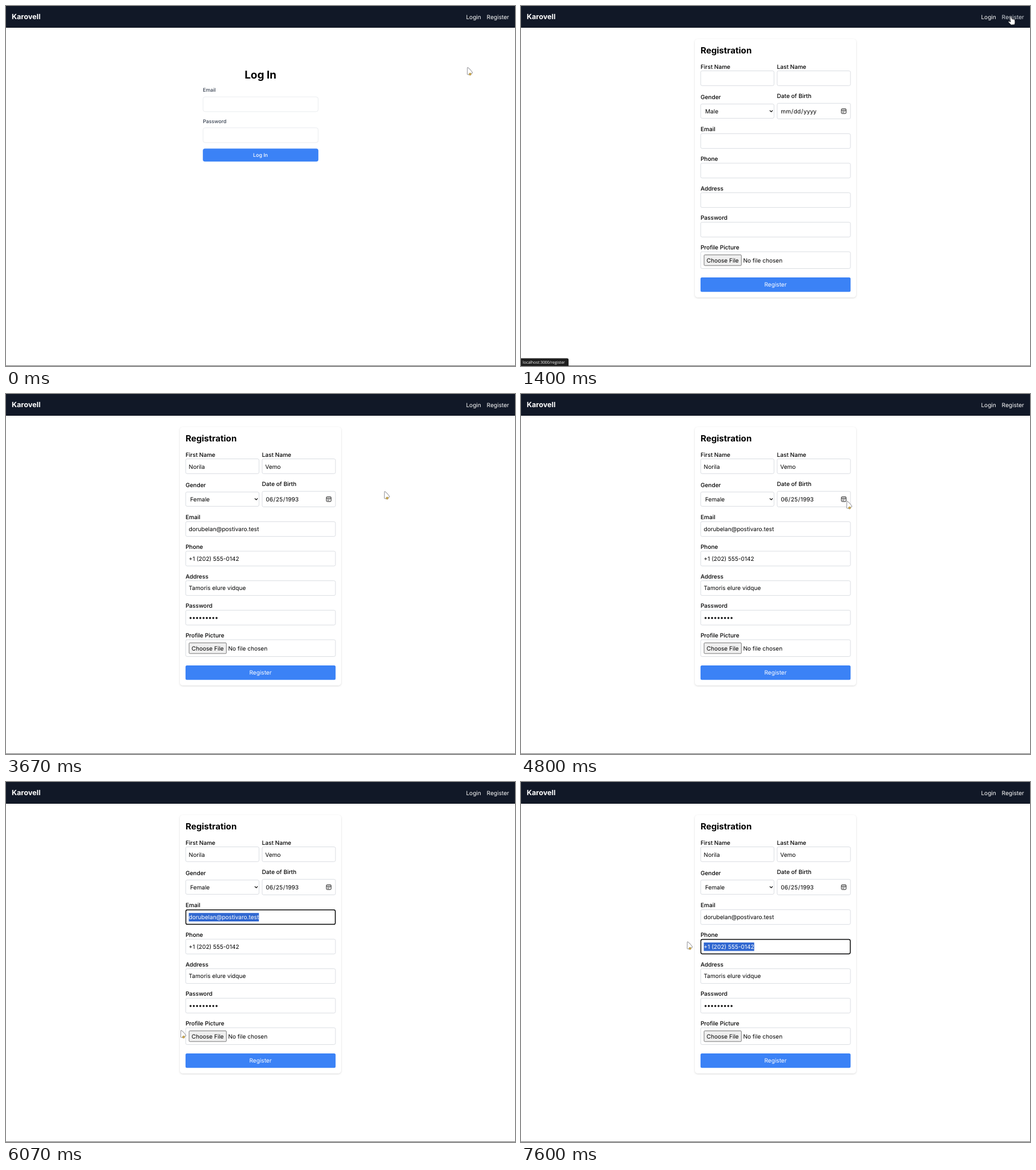
These frames come from a looping animation (890 px wide and 630 px high, 8 s). An HTML page:

```html
<!DOCTYPE html>
<html lang="en">
<head>
<meta charset="utf-8">
<title>Registration form</title>
<style>
html, body { margin: 0; width: 100%; height: 100%; overflow: hidden; background: #fff; }
svg { display: block; width: 100%; height: 100%; }
text { font-family: Inter, sans-serif; font-size: 10.08px; text-rendering: geometricPrecision; white-space: pre; }
.b { font-weight: 700; }
.m { font-weight: 500; }
.s { font-size: 8.82px; }
.mid { text-anchor: middle; }
.bar { filter: drop-shadow(0 1.6px 1.8px rgba(0, 0, 0, .16)); }
.card { filter: drop-shadow(0 1.6px 1.8px rgba(0, 0, 0, .15)); }
#status text { font-family: "Open Sans", sans-serif; font-size: 6.95px; }
</style>
</head>
<body>
<svg id="stage" viewBox="0 0 890 630" preserveAspectRatio="none"></svg>
<script>
const LOOP = 8000, STEP = 200 / 3;
const ROW = 51.66;
const BLUE = '#3b82f6';
const EMAIL = 'dorubelan@postivaro.test';
const PHONE = '+1 (202) 555-0142';

const text = (x, y, s, cls = '', fill = '#000', extra = '') =>
  `<text x="${x}" y="${y}" class="${cls}" fill="${fill}" ${extra}>${s}</text>`;
const rect = (x, y, w, h, fill, extra = '') =>
  `<rect x="${x}" y="${y}" width="${w}" height="${h}" fill="${fill}" ${extra}/>`;
const box = (x, y, w, h, line = '#d1d5db', r = 2.5) =>
  rect(x + .3, y + .3, w - .6, h - .6, '#fff', `rx="${r}" stroke="${line}" stroke-width=".8"`);
const group = (id, body) => `<g id="${id}">${body}</g>`;
const date = (a, b, c) =>
  text(454.3, 187.8, [a, '/', b, '/', c].map((p, i) => `<tspan dx="${i ? .63 : 0}">${p}</tspan>`).join(''));

const header =
  rect(0, 0, 890, 37.8, '#111827', 'class="bar"') +
  rect(0, 36.9, 890, .9, '#0b101c') +
  text(10, 23.3, 'Karovell', 'b', '#fff', 'style="font-size:12.6px"') +
  text(804.4, 22.8, 'Login', '', '#fff') +
  text(840.6, 22.8, 'Register', '', '#fff', 'id="link"');

const login =
  text(445, 126.7, 'Log In', 'b mid', '#000', 'style="font-size:18.9px"') +
  text(344.2, 150.4, 'Email', 's m', '#374151') +
  box(344.2, 158.7, 202, 26.5, '#e5e7eb', 3.8) +
  text(344.2, 204.6, 'Password', 's m', '#374151') +
  box(344.2, 212.8, 202, 26.5, '#e5e7eb', 3.8) +
  rect(344.2, 249.5, 202, 22.7, BLUE, 'rx="3.8"') +
  text(445, 264, 'Log In', 's m mid', '#fff');

const calendar =
  `<g fill="none" stroke="#111" stroke-width=".95">
    <rect x="560.2" y="179.8" width="8.2" height="8.4" rx="1.4"/><path d="M560.2 182.3h8.2"/>
    <path d="M562 184.3h4.8M562 186.2h3" stroke-dasharray="1.2 .6"/></g>`;

const labels = ['Email', 'Phone', 'Address', 'Password', 'Profile Picture'];
const register =
  rect(304, 57.8, 282, 452.2, '#fff', 'rx="5" class="card"') +
  text(313.9, 83.2, 'Registration', 'b', '#000', 'style="font-size:15.12px"') +
  text(313.9, 109.6, 'First Name', 'm') + box(313.9, 113.2, 128.8, 26.5) +
  text(447.6, 109.6, 'Last Name', 'm') + box(447.6, 113.2, 128.8, 26.5) +
  text(313.9, 162.6, 'Gender', 'm') + box(313.9, 171.2, 128.8, 25.6) +
  '<path d="M434.9 182.6l2.6 2.6 2.6-2.6" fill="none" stroke="#000" stroke-width="1.2"/>' +
  text(447.6, 161.4, 'Date of Birth', 'm') + box(447.6, 170, 128.8, 27.8) + calendar +
  labels.map((s, i) => text(313.9, 219.3 + ROW * i, s, 'm') +
    box(313.9, 223.1 + ROW * i, 262.4, i == 4 ? 30 : 26.5)).join('') +
  rect(320.1, 435.5, 65.2, 18.7, '#efefef', 'rx="1.3" stroke="#6b6b6b" stroke-width=".9"') +
  text(324.6, 448.5, 'Choose File') + text(388.4, 448.5, 'No file chosen') +
  rect(313.9, 475, 262.4, 25.2, BLUE, 'rx="2.5"') +
  text(445, 491.4, 'Register', 'mid', '#fff');

const dots = Array.from({ length: 9 }, (_, i) =>
  `<circle cx="${322.7 + 5.68 * i}" cy="391.9" r="1.75"/>`).join('');
const blank = text(322, 187.9, 'Male') + date('mm', 'dd', 'yyyy');
const filled =
  text(319.6, 130.6, 'Norila') + text(453.2, 130.6, 'Vemo') +
  text(322, 187.9, 'Female') + date('06', '25', '1993') +
  text(319.6, 240.1, EMAIL, '', '#000', 'id="email"') +
  text(319.6, 240.1 + ROW, PHONE, '', '#000', 'id="phone"') +
  text(319.6, 240.1 + 2 * ROW, 'Tamoris elure vidque') + dots;

const focus = rect(314.5, 223.8, 261.2, 25.2, 'none', 'rx="2.6" stroke="#0c0c0c" stroke-width="1.5"') +
  rect(0, 229.4, .8, 14.6, '#000', 'id="caret"') +
  group('marked', rect(0, 229.2, 0, 14.8, '#3067d0', 'id="mark"') +
    '<clipPath id="cut"><rect id="cutBox" y="228" height="18"/></clipPath>' +
    text(319.6, 240.1, '', '', '#fff', 'id="white" clip-path="url(#cut)"'));

const status =
  '<path d="M0 616.6h80.5q2.7 0 2.7 2.7V630H0z" fill="#1f1f1f"/>' +
  text(3, 626, 'localhost:3000/register', '', '#fff');

const cursors =
  group('arrow', `<path d="M.7 1.6Q.8 .2 2 .9Q6.5 4.300 9.600 9.300Q9.800 10.200 8.800 10.600L4.700 13.200L1.300 12.900Q.5 12.800.5 12Z"
    fill="#fff" stroke="#9b9ba0" stroke-width="1.1"/><circle cx="5.500" cy="12.300" r="2" fill="#d0aa48" stroke="#9c8752" stroke-width=".6"/>`) +
  group('hand', `<path d="M1.300 1Q2.300 0 3.300 1L4.700 5.200Q5.800 4.600 6.300 5.200Q7.300 4.700 7.800 5.500Q9 5.200 9.300 6.500L9.800 10Q9.800 12 8.800 14.500L3.200 15L-1.600 10.200Q-2.300 8.800-.8 8.700L2 10.100Z"
    fill="#fff" stroke="#222" stroke-width=".6"/>`) +
  group('beam', '<path d="M-3 -6H3M-3 6H3M0 -6V6" fill="none" stroke="#a49c8c" stroke-width="1.8"/>');

const stage = document.getElementById('stage');
stage.innerHTML = rect(0, 0, 890, 630, '#fff') + header + group('login', login) +
  group('register', register + group('blank', blank) + group('filled', filled) + group('focus', focus)) +
  rect(0, 629, 890, 1, '#777') + group('status', status) + group('cursor', cursors);

const el = {};
stage.querySelectorAll('[id]').forEach(e => el[e.id] = e);
const show = (id, on) => el[id].setAttribute('display', on ? 'inline' : 'none');
const set = (id, attrs) => { for (const k in attrs) el[id].setAttribute(k, attrs[k]); };

// Pointer path: tick, x, y, eased
const path = [
  [0, 806, 107], [2, 806, 107], [4, 804, 104], [7, 804, 104], [14, 854, 18, 1],
  [24, 854, 18], [33, 661, 170, 1], [60, 661, 170], [61, 663, 170], [66, 663, 170],
  [67, 661, 166], [72, 569, 187], [76, 400.5, 290.5], [78, 400.5, 290.5],
  [86, 463, 239, 1], [91, 305, 434, 1], [101, 305, 434], [109, 436, 295, 1],
  [114, 290, 279, 1], [120, 290, 279]
];

function pointer(n) {
  const i = Math.max(1, path.findIndex(p => p[0] >= n));
  const [n0, x0, y0] = path[i - 1], [n1, x1, y1, eased] = path[i];
  let k = (n - n0) / (n1 - n0);
  if (eased) k = k * k * (3 - 2 * k);
  return [x0 + (x1 - x0) * k, y0 + (y1 - y0) * k];
}

function cursorKind(x, y, onForm) {
  if (y > 11 && y < 28 && x > 804 && x < 881) return 'hand';
  const row = (y - 223.1) / ROW;
  const inRow = row >= 0 && row < 4 && row % 1 < .51;
  return onForm && inRow && x > 314 && x < 576 ? 'beam' : 'arrow';
}

function select(n, x) {
  const onPhone = n >= 110;
  const end = 319.6 + el[onPhone ? 'phone' : 'email'].getComputedTextLength();
  const dragging = (n > 86 && n <= 91) || onPhone;
  const from = dragging ? Math.min(end, Math.max(319.6, x)) : 319.6;
  const span = n > 86 ? end - from : 0;
  set('focus', { transform: `translate(0 ${onPhone ? ROW : 0})` });
  set('mark', { x: from, width: span });
  set('cutBox', { x: from, width: span });
  set('caret', { x: end + .2 });
  el.white.textContent = onPhone ? PHONE : EMAIL;
  show('marked', span > 0);
  show('caret', span <= 0);
}

function draw(t) {
  const n = Math.floor((t + 4) / STEP);
  const [x, y] = pointer(n);
  const onForm = n >= 21, done = n >= 55;
  const kind = cursorKind(x, y, onForm);
  show('login', !onForm);
  show('register', onForm);
  show('blank', !done);
  show('filled', done);
  show('focus', n >= 86);
  if (n >= 86) select(n, x);
  for (const k of ['arrow', 'hand', 'beam']) show(k, k === kind);
  set('cursor', { transform: `translate(${x} ${y})` });
  set('link', { fill: kind === 'hand' && x > 838 ? '#d1d5db' : '#fff' });
  const fade = Math.min((n - 16) / 3, (31 - n) / 3);
  set('status', { opacity: Math.max(0, Math.min(1, fade)) });
}

function frame(now) {
  draw(now % LOOP);
  requestAnimationFrame(frame);
}
draw(0);
requestAnimationFrame(frame);
</script>
</body>
</html>
```
